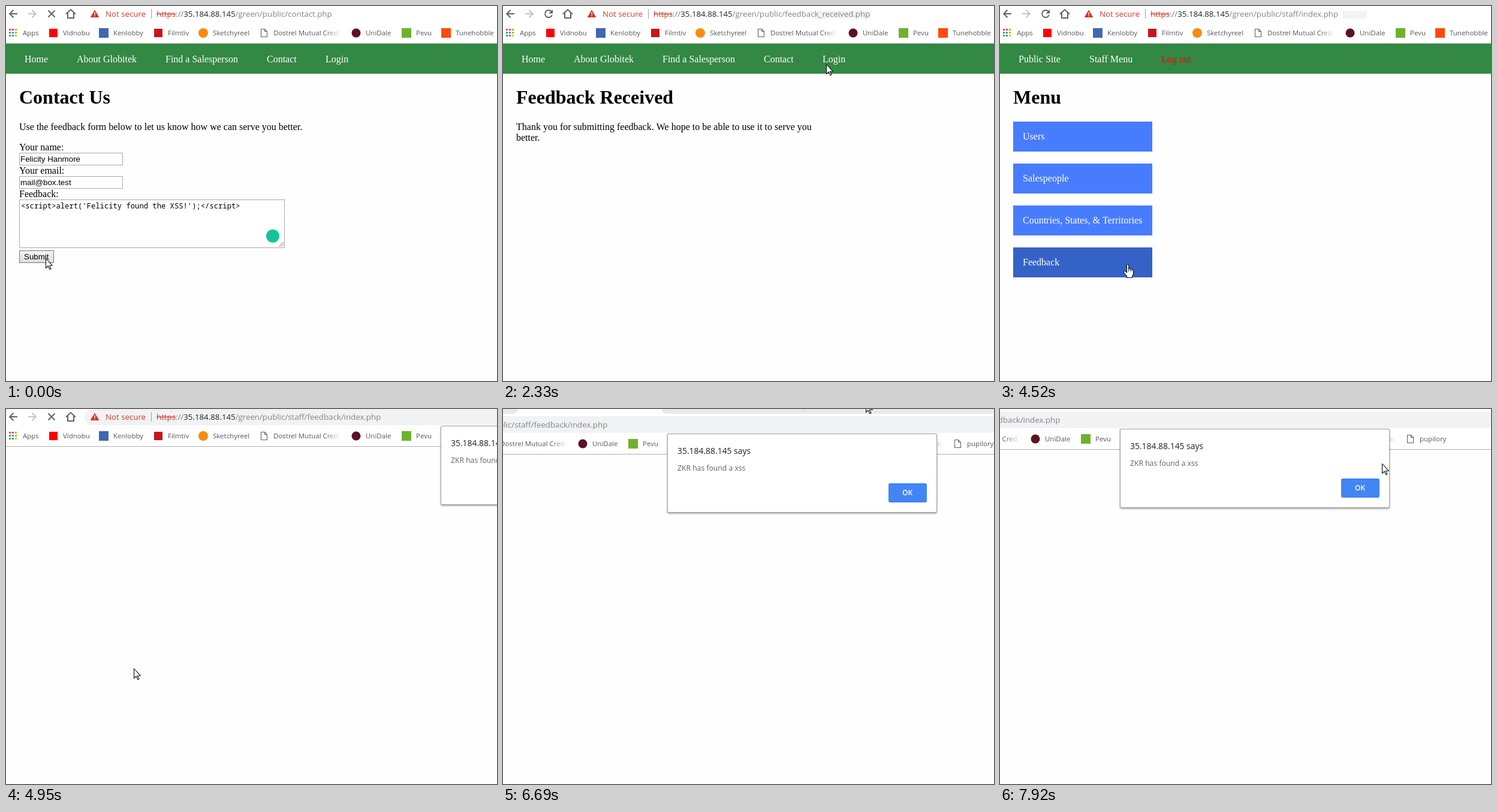
Write an HTML page with a canvas that moves like this. It is 819x626 px and loops after 8000 ms.

```html
<!DOCTYPE html>
<html lang="en">
<head>
<meta charset="utf-8">
<title>Feedback form walkthrough</title>
<style>
  html, body { margin: 0; width: 100%; height: 100%; overflow: hidden; background: #fefefe; }
  canvas { display: block; width: 819px; height: 626px; }
</style>
</head>
<body>
<canvas id="stage"></canvas>
<script>
const W = 819, H = 626, LOOP = 8000;
const canvas = document.getElementById('stage');
const ctx = canvas.getContext('2d');
const dpr = window.devicePixelRatio || 1;
canvas.width = W * dpr;
canvas.height = H * dpr;

const UI = '"Open Sans", "Noto Sans", sans-serif';
const SERIF = '16px "Liberation Serif", serif';
const TITLE = 'bold 32px "Liberation Serif", serif';
const FIELD = '13.33px "Liberation Sans", sans-serif';
const MONO = '12.2px "Noto Sans Mono", monospace';
const URL_FONT = '13.28px ' + UI;
const MARK_FONT = '11.5px ' + UI;
const INK = '#5f6368';

// Screen refreshes: start, end, number of steps
const REFRESH = [
  [0, 0, 1], [380, 380, 1], [1060, 1060, 1], [1370, 2330, 8], [2460, 3400, 7],
  [3550, 4520, 8], [4800, 5760, 8], [5880, 6810, 8], [6930, 7510, 5], [7790, 7920, 2]
];
// Time, x, y
const POINTER = [
  [1230, 66, 421], [2330, 539, 97], [2460, 541, 91], [2900, 542, 93], [3400, 543, 99],
  [3550, 525, 112], [4520, 213, 431], [4800, 213, 433], [4940, 213, 433],
  [5760, 604, 4], [5880, 603, -13], [7510, 607, -8], [7920, 637, 91]
];
const PAN = [
  [5760, 0, 0], [6670, -451, 13], [6810, -472, 19], [7510, -515, 26], [7920, -525, 5]
];

function refreshTime(t) {
  const [a, b, n] = REFRESH.filter(r => t >= r[0]).pop();
  if (n < 2) return a;
  const gap = (b - a) / (n - 1);
  return a + gap * Math.min(n - 1, Math.floor((t - a) / gap + 0.001));
}

function track(keys, t) {
  const i = keys.findIndex(k => k[0] > t);
  if (i === 0) return keys[0].slice(1);
  if (i < 0) return keys[keys.length - 1].slice(1);
  const [a, x, y] = keys[i - 1], [b, u, v] = keys[i];
  const p = (t - a) / (b - a), e = p * p * (3 - 2 * p);
  return [Math.round(x + (u - x) * e), Math.round(y + (v - y) * e)];
}

function text(s, x, y, font, color) {
  ctx.font = font;
  ctx.fillStyle = color;
  ctx.fillText(s, x, y);
  return x + ctx.measureText(s).width;
}

function rect(x, y, w, h, color) {
  ctx.fillStyle = color;
  ctx.fillRect(x, y, w, h);
}

function round(x, y, w, h, r, color) {
  ctx.fillStyle = color;
  ctx.beginPath();
  ctx.roundRect(x, y, w, h, r);
  ctx.fill();
}

function disc(x, y, r, color) {
  ctx.fillStyle = color;
  ctx.beginPath();
  ctx.arc(x, y, r, 0, 7);
  ctx.fill();
}

function box(x, y, w, h, color, fill = '#fff') {
  rect(x, y, w, h, color);
  rect(x + 1, y + 1, w - 2, h - 2, fill);
}

function stroke(d, color, width = 2) {
  ctx.strokeStyle = color;
  ctx.lineWidth = width;
  ctx.stroke(new Path2D(d));
}

function fill(d, color) {
  ctx.fillStyle = color;
  ctx.fill(new Path2D(d));
}

function fade(x0, x1, from) {
  const g = ctx.createLinearGradient(x0, 0, x1, 0);
  g.addColorStop(0, `rgba(85,88,93,${from})`);
  g.addColorStop(1, 'rgba(85,88,93,0)');
  return g;
}

function docIcon(x) {
  stroke(`M${x + 0.5} 38.5h6l4 4v9h-10zM${x + 6.5} 38.5v4h4`, INK, 1.1);
}

function buttons(loading) {
  stroke('M19 13H6.5M12.5 6.7L6.2 13l6.3 6.3', INK);
  stroke('M37 13h12.5M43.5 6.7L49.8 13l-6.3 6.3', '#c2c4c7');
  if (loading) {
    stroke('M70.5 7.5l11 11M81.5 7.5l-11 11', INK);
  } else {
    stroke('M80.5 9A6 6 0 1 0 81.8 15', INK);
    fill('M83 6v6.5h-6.5z', INK);
  }
  stroke('M100 13.5L108 6l8 7.5M103 11.5v8.5h10v-8.5', INK);
}

const PATHS = {
  contact: '/green/public/contact.php',
  received: '/green/public/feedback_received.php',
  menu: '/green/public/staff/index.php',
  blank: '/green/public/staff/feedback/index.php'
};

function addressBar(url, hover) {
  if (url === 'blank') round(131, -1, 1500, 28, 14, hover ? '#ebedef' : '#f1f2f4');
  if (url === 'received') rect(520, 8, 92, 13, '#f1f3f4');
  if (url === 'menu') rect(572, 8, 40, 13, '#f3f3f4');
  fill('M148 6.5l7.3 12.5h-14.6z', '#d93025');
  rect(147.3, 10.5, 1.5, 4, '#fff');
  rect(147.3, 15.7, 1.5, 1.5, '#fff');
  text('Not secure', 166, 18, URL_FONT, '#d33b30');
  rect(242, 5, 1, 16, '#9c9fa3');
  let x = text('https', 251, 18, URL_FONT, '#d33b30');
  rect(251, 13, x - 251, 1, '#d33b30');
  x = text('://', x, 18, URL_FONT, '#777b80');
  x = text('35.184.88.145', x, 18, URL_FONT, '#202124');
  text(PATHS[url], x, 18, URL_FONT, '#80848a');
}

function bookmarks() {
  const dots = ['#ea4335', '#ea4335', '#f29900', '#34a853', '#4285f4', '#f29900', '#34a853', '#34a853', '#fbbc05'];
  dots.forEach((c, i) => rect(5 + i % 3 * 5, 38 + Math.floor(i / 3) * 5, 3, 3, c));
  rect(72, 38, 14, 14, '#f00');
  rect(155, 37, 16, 16, '#4267b2');
  rect(247, 38, 14, 14, '#c9141c');
  disc(329, 45, 8, '#f88c12');
  docIcon(425);
  disc(584, 45, 7.5, '#5d1220');
  rect(660, 37, 16, 16, '#6fb12f');
  rect(726, 37, 16, 16, '#ff4a0a');
  docIcon(1204);
  const names = [
    ['Apps', 28], ['Vidnobu', 95], ['Kenlobby', 179], ['Filmtiv', 270], ['Sketchyreel', 345],
    ['UniDale', 600], ['Pevu', 684], ['Tunehobble', 750], ['pupilory', 1225]
  ];
  for (const [name, x] of names) text(name, x, 49, MARK_FONT, '#55585d');
  text('Dostrel Mutual Credit', 446, 49, MARK_FONT, fade(534, 558, 1));
  text('oc', 1172, 49, MARK_FONT, fade(1172, 1185, 0.6));
}

function nav(items) {
  rect(0, 63, W, 50, '#338844');
  for (const [label, x, color = '#fff'] of items) text(label, x, 94, SERIF, color);
}

const PUBLIC_NAV = [['Home', 31], ['About Globitek', 118], ['Find a Salesperson', 266], ['Contact', 435], ['Login', 533]];
const STAFF_NAV = [['Public Site', 31], ['Staff Menu', 149], ['Log out', 269, '#f00']];

const line = (s, y) => text(s, 22, y, SERIF, '#000');
const title = s => text(s, 22, 163, TITLE, '#000');

const pages = {
  contact() {
    nav(PUBLIC_NAV);
    title('Contact Us');
    line('Use the feedback form below to let us know how we can serve you better.', 207);
    line('Your name:', 241);
    box(22, 245, 173, 21, '#a9a9a9');
    text('Felicity Hanmore', 24, 260, FIELD, '#000');
    line('Your email:', 280);
    box(22, 284, 173, 21, '#a9a9a9');
    text('mail@box.test', 24, 299, FIELD, '#000');
    line('Feedback:', 319);
    box(22, 323, 443, 81, '#a9a9a9');
    text("<script>alert('Felicity found the XSS!');<\/script>", 25, 338, MONO, '#000');
    disc(445, 384, 11, '#15c39a');
    stroke('M455 402l8-8M459 402l4-4', '#777', 1);
    const g = ctx.createLinearGradient(0, 408, 0, 429);
    g.addColorStop(0, '#f6f6f6');
    g.addColorStop(1, '#dcdcdc');
    box(22, 408, 58, 21, '#767676', g);
    text('Submit', 30, 423, FIELD, '#000');
  },
  received() {
    nav(PUBLIC_NAV);
    title('Feedback Received');
    line('Thank you for submitting feedback. We hope to be able to use it to serve you', 207);
    line('better.', 225);
  },
  menu(hover) {
    nav(STAFF_NAV);
    title('Menu');
    ['Users', 'Salespeople', 'Countries, States, & Territories', 'Feedback'].forEach((label, i) => {
      const y = 193 + i * 70;
      rect(22, y, 232, 50, hover && i === 3 ? '#3462c6' : '#487cff');
      text(label, 38, y + 30, SERIF, '#fff');
    });
  },
  blank: dialog
};

function dialog() {
  ctx.save();
  ctx.shadowColor = 'rgba(0,0,0,.4)';
  ctx.shadowBlur = 3 * dpr;
  ctx.shadowOffsetY = 1.5 * dpr;
  round(725, 28, 450, 132, 3, '#a5a5a5');
  ctx.restore();
  round(726, 29, 448, 130, 2, '#fff');
  text('35.184.88.145 says', 742, 62, '13.9px ' + UI, '#202124');
  text('ZKR has found a xss', 742, 90, '12.2px ' + UI, INK);
  round(1094, 111, 64, 32, 3, '#4285f4');
  text('OK', 1117, 131, '600 12px ' + UI, '#fff');
}

const ARROW = 'M.5 .5V16.5L4.2 13L7 18.8L9 17.8L6.4 12.2H11.3Z';
const HAND = 'M-1.5 1Q0 -1 1.5 1V7.5Q3 6.3 4.3 8Q5.8 7 7 8.8Q9.5 8 9.5 11V16.5L7.5 20V22.5H-1.5V20L-6 14.5Q-7.5 12 -5.5 11.2Q-4 11 -1.5 14Z';

function pointer(kind, x, y) {
  ctx.save();
  ctx.translate(x, y);
  if (kind === 'beam') {
    stroke('M.5 -9V9M-2.5 9.5h2M1.5 9.5h2', '#000', 1);
  } else {
    const shape = kind === 'hand' ? HAND : ARROW;
    ctx.lineJoin = 'round';
    fill(shape, '#fff');
    stroke(shape, '#111', 1.1);
    if (kind === 'hand') stroke('M1.5 7.5V12M4.3 8V12M7 8.8V12', '#111', 1);
  }
  ctx.restore();
}

function draw(now) {
  const t = refreshTime(now % LOOP);
  const [x, y] = track(POINTER, t);
  const [dx, dy] = track(PAN, t);
  const page = t < 1060 ? 'contact' : t < 2870 ? 'received' : t < 4930 ? 'menu' : 'blank';
  const url = page === 'contact' && t >= 380 ? 'received' : page;
  const loading = t < 1060 || (t > 2600 && t < 2870) || t >= 4800;
  const onItem = page === 'menu' && x > 22 && x < 254 && y > 403;
  const onLogin = page === 'received' && t >= 2460;
  const onBar = page === 'blank' && y < 27 && t < 5880;
  const kind = onItem || onLogin ? 'hand' : onBar ? 'beam' : 'arrow';

  ctx.setTransform(dpr, 0, 0, dpr, 0, 0);
  rect(0, 0, W, H, '#fefefe');
  ctx.translate(dx, dy);
  rect(0, -60, 1800, 122, '#fff');
  round(-100, -60, 576, 55, [0, 0, 8, 0], '#e7e9ed');
  round(716, -60, 1100, 55, [0, 0, 0, 8], '#e7e9ed');
  rect(954, -30, 1, 19, '#a4a7ab');
  addressBar(url, onBar);
  buttons(loading);
  bookmarks();
  rect(0, 62, 1800, 1, '#aeafb1');
  pages[page](onItem);
  ctx.translate(-dx, -dy);
  pointer(kind, x, y);
}

function loop() {
  draw(performance.now());
  requestAnimationFrame(loop);
}
loop();
</script>
</body>
</html>
```
